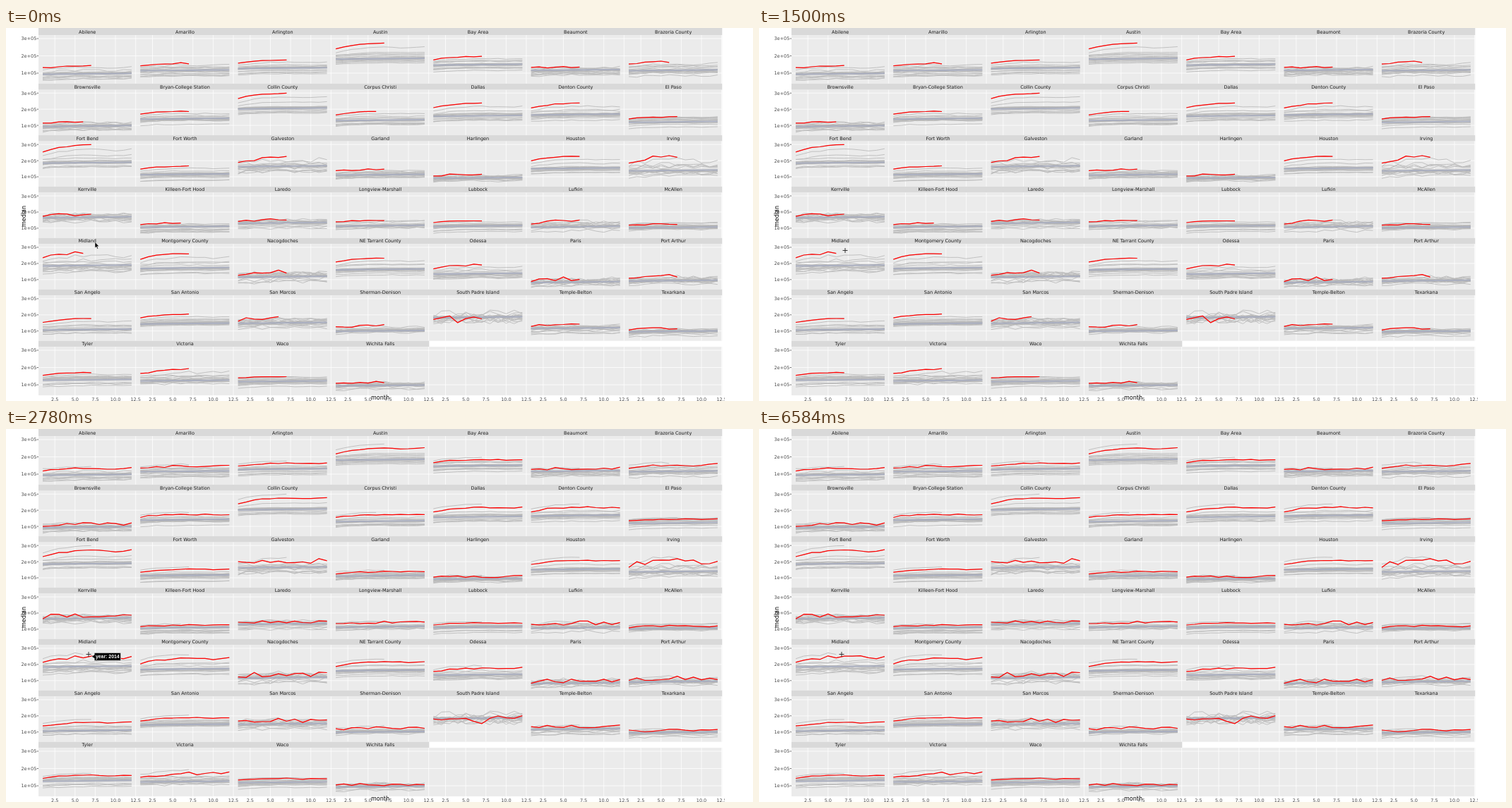
An HTML page that plays this animation: 1058 px wide and 529 px high, repeating every 8000 ms.

```html
<!DOCTYPE html>
<html lang="en">
<head>
<meta charset="utf-8">
<title>Monthly median by city</title>
<style>
  html, body { margin: 0; width: 100%; height: 100%; overflow: hidden; background: #fff; }
  svg { display: block; width: 100%; height: 100%; }
  text { font: 6.5px "DejaVu Sans", sans-serif; text-anchor: middle; fill: #1a1a1a; }
  .tick { fill: #4d4d4d; }
  .ylab { text-anchor: end; }
  .axis { font-size: 8px; fill: #000; }
  .hover { font: bold 6.9px "Liberation Sans", Arial, sans-serif; fill: #fff; }
  path { fill: none; stroke-linejoin: round; }
  .grid { stroke: #fff; stroke-width: .75; }
  .years { stroke: #bebebe; stroke-width: .95; }
  .ribbon { stroke: #999; stroke-opacity: .3; stroke-width: 4; }
  .smooth { stroke: #a9aec0; stroke-width: 1.8; }
  .red { stroke: #f00; stroke-width: 1.25; }
  .black { fill: #000; stroke: #fff; stroke-width: .5; }
</style>
</head>
<body>
<svg id="stage" viewBox="0 0 1058 529"></svg>
<script>
const LEFT = 46, COL = 138.33, MONTH = 11.45, COLUMNS = 7, ROWS = 7;
const TICKS = [2.5, 5, 7.5, 10, 12.5];

// The first and last rows are slightly taller than the rest.
const unit = row => row % 6 ? 22.9 : 24.5;                       // height of 1e+05
const base = row => row ? row < 6 ? 65.2 + 72.9 * row : 506 : 64; // position of 1e+05
const panelTop = row => base(row) - 2.2 * unit(row);
const panelBottom = row => base(row) + .61 * unit(row);
const monthX = (col, month) => LEFT + 6 + col * COL + (month - 1) * MONTH;

let seed = 2014;
const random = () => (seed = seed * 16807 % 2147483647) / 2147483647;
const jitter = size => (random() * 2 - 1) * size;

const rect = (x, y, w, h, fill) => `<rect x="${x}" y="${y}" width="${w}" height="${h}" fill="${fill}"/>`;
const path = (d, cls) => `<path class="${cls}" d="${d}"/>`;
const label = (x, y, text, cls = '') => `<text class="${cls}" x="${x}" y="${y}">${text}</text>`;

let back = '', labels = '', plots = '', latest = '', previous = '', count = 0;

function drawRow(row) {
  const top = panelTop(row), bottom = panelBottom(row);
  const stripTop = row ? panelBottom(row - 1) : 0;
  const columns = row < 6 ? COLUMNS : 4;
  back += rect(LEFT, stripTop, columns * COL, top - stripTop, '#d9d9d9');
  back += rect(LEFT, top, COLUMNS * COL, bottom - top, '#ebebeb');
  let grid = '';
  for (let k = 1; k <= 3; k++) {
    const y = base(row) - (k - 1) * unit(row);
    grid += `M${LEFT} ${y}h${COLUMNS * COL}`;
    back += `<path stroke="#333" stroke-width=".7" d="M43.8 ${y}h2.2"/>`;
    labels += label(43.3, y + 2.4, k + 'e+05', 'tick ylab');
  }
  for (let col = 0; col < COLUMNS; col++)
    for (const t of TICKS) grid += `M${monthX(col, t)} ${top}V${bottom}`;
  back += path(grid, 'grid');
}

function drawAxes() {
  for (let col = 0; col < COLUMNS; col++)
    for (const t of TICKS) labels += label(monthX(col, t), 529, t.toFixed(1), 'tick');
  labels += rect(1018, 520, 40, 9, '#fff');
  labels += label(530, 526.5, 'month', 'axis');
  labels += '<text class="axis" transform="translate(28 267) rotate(-90)">median</text>';
}

// Quick rise in spring, a dip around October, recovery in December.
const season = m => .65 - (1 - Math.exp(-m / 2.5)) + .2 * Math.exp(-(((m - 9) / 1.8) ** 2));

function yearLine(col, level, rise, rough, months = 12) {
  const points = Array.from({ length: months }, (_, m) =>
    `${monthX(col, m + 1).toFixed(1)} ${(level + rise * season(m) + jitter(rough)).toFixed(1)}`);
  return 'M' + points.join('L');
}

// level: trend above 1e+05; lead: how far 2014 runs above it; rough: monthly noise
function city(name, level, lead, rough, latestMonths = 7) {
  const col = count % COLUMNS, row = Math.floor(count++ / COLUMNS);
  const mid = base(row) - level, rise = .65 * lead;
  const spread = Math.min(9, (panelBottom(row) - mid) / 2);
  labels += label(LEFT + (col + .5) * COL, panelTop(row) - 2.1, name);

  const now = yearLine(col, mid - 1.4 * lead, rise, rough * .8, latestMonths);
  const before = yearLine(col, mid - lead, rise, rough);
  let years = now + before + yearLine(col, mid - lead * .55, rise * .7, rough);
  for (let i = 0; i < 11; i++) {
    const offset = spread * (random() + random() - .85);
    years += yearLine(col, mid + offset, 2.5, rough * .75);
  }
  const trend = `M${monthX(col, 1)} ${mid + .7}L${monthX(col, 12)} ${mid - .7}`;
  plots += path(years, 'years') + path(trend, 'ribbon') + path(trend, 'smooth');
  latest += now;
  previous += before;
}

for (let row = 0; row < ROWS; row++) drawRow(row);
drawAxes();

city('Abilene', -1, 8, 1.4);
city('Amarillo', 4, 6.5, 1.3);
city('Arlington', 7, 7.5, .6);
city('Austin', 20.5, 14, .5);
city('Bay Area', 12, 7.5, .8);
city('Beaumont', 4.5, 3, 1.8);
city('Brazoria County', 4, 8, 1.8, 6);

city('Brownsville', -1, 4, 1.8, 6);
city('Bryan-College Station', 9.5, 6.5, 1);
city('Collin County', 24, 14, .7);
city('Corpus Christi', 7.5, 8, .7, 6);
city('Dallas', 13.5, 11.5, .7);
city('Denton County', 15.5, 10, 1.2);
city('El Paso', 5, 4.5, .6);

city('Fort Bend', 20, 16, 1);
city('Fort Worth', 3.5, 7.5, .6);
city('Galveston', 15, 8, 3.5);
city('Garland', 3, 5, 1.2);
city('Harlingen', -1.5, 3, 1.8);
city('Houston', 12, 11, .7);
city('Irving', 9, 13, 4);

city('Kerrville', 15.5, 3, 3.5);
city('Killeen-Fort Hood', 2, 3.5, 1.2, 6);
city('Laredo', 7.5, 3, 2);
city('Longview-Marshall', 3.5, 5.5, 1.6);
city('Lubbock', 3, 5, .6);
city('Lufkin', 2, 6, 3);
city('McAllen', 1, 3, 1.2);

city('Midland', 20, 12, 2.5, 6);
city('Montgomery County', 16.5, 13, 1);
city('Nacogdoches', 4, 5, 4);
city('NE Tarrant County', 14.5, 10.5, .7);
city('Odessa', 8.5, 8, 1.5);
city('Paris', -3.5, 3, 3.5);
city('Port Arthur', -1.5, 4.5, 2.8);

city('San Angelo', 2, 10, 1);
city('San Antonio', 10.5, 8.5, .5);
city('San Marcos', 11.5, 4.5, 3, 6);
city('Sherman-Denison', 0, 5, 1.8);
city('South Padre Island', 19.5, -2, 7);
city('Temple-Belton', 4, 3.5, 2.2);
city('Texarkana', -.5, 2.5, 1.8);

city('Tyler', 7, 6.5, 1);
city('Victoria', 6, 10, 2.2);
city('Waco', 5, 4.5, .8);
city('Wichita Falls', -1, 2.5, 2.6);

const stage = document.getElementById('stage');
stage.innerHTML = back + plots + `
  <path id="latest" class="red" d="${latest}"/>
  <path id="previous" class="red" d="${previous}"/>
  ${labels}
  <path id="arrow" class="black" d="M0 0v8.4l1.9-1.7 1.4 3.1 1.3-.6-1.4-2.9h2.6z"/>
  <path id="cross" d="M-3.5 0h7M0-3.5v7" stroke="#222" stroke-width=".9"/>
  <g id="tip">
    <path class="black" d="M121.3 322.7l3.9-2.5v-2.8h37.3v11h-37.3v-3.2z"/>
    ${label(143.8, 325.3, 'year: 2014', 'hover')}
  </g>`;

// pointer steps: time, x, y
const arrowSteps = [[0, 126, 303.5], [1170, 125.5, 308]];
const crossSteps = [[1500, 122, 315.5], [1640, 121, 316.5], [1880, 117, 319.5]];

const show = (id, on) => document.getElementById(id).setAttribute('visibility', on ? 'visible' : 'hidden');

function place(id, steps, time) {
  const [, x, y] = steps.filter(step => step[0] <= time).pop() || steps[0];
  document.getElementById(id).setAttribute('transform', `translate(${x} ${y})`);
}

function render() {
  const time = performance.now() % 8000;
  place('arrow', arrowSteps, time);
  place('cross', crossSteps, time);
  show('arrow', time < 1500);
  show('cross', time >= 1500);
  show('latest', time < 2780);
  show('previous', time >= 2780);
  show('tip', time >= 2780 && time < 4460);
  requestAnimationFrame(render);
}
render();
</script>
</body>
</html>
```
